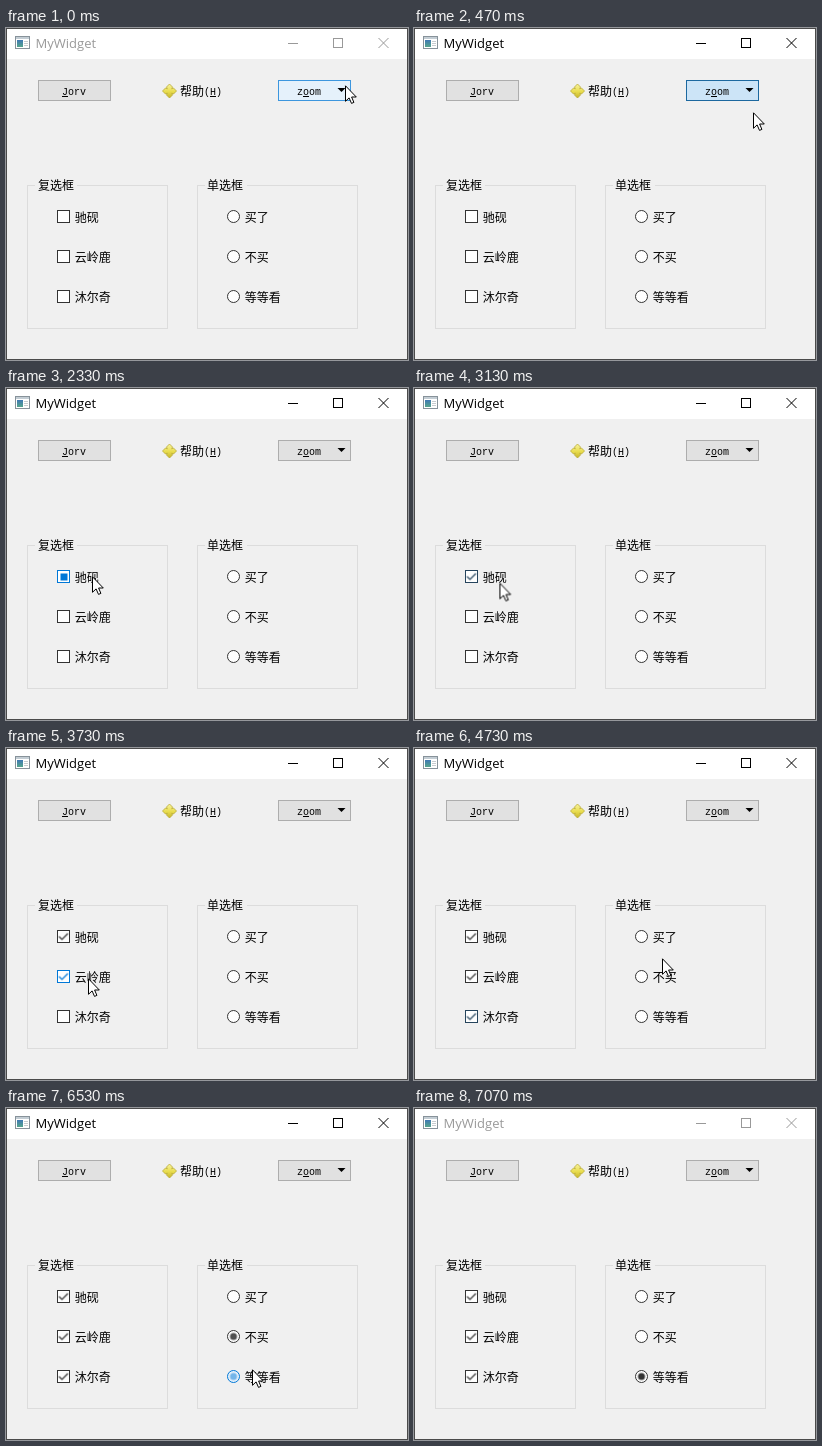
These frames come from a looping animation (402x332 px, 7190 ms). An HTML page:

```html
<!DOCTYPE html>
<html lang="zh-CN">
<head>
<meta charset="utf-8">
<title>MyWidget</title>
<style>
html, body { margin: 0; width: 100%; height: 100%; overflow: hidden; background: #f0f0f0; }
svg { display: block; width: 402px; height: 332px; }
text { font: 500 12px "Noto Sans CJK SC", "Noto Sans CJK", sans-serif; fill: #000; }
.mono { font: 10px "Liberation Mono", "DejaVu Sans Mono", monospace; }
#caption { color: #999; }
#caption text { font: 13px "Open Sans", "Noto Sans", sans-serif; fill: currentColor; }
.line { fill: none; stroke: currentColor; }
.crisp { shape-rendering: crispEdges; }
.button { fill: #e1e1e1; stroke: #adadad; }
.group { fill: none; stroke: #dcdcdc; }
.option { color: #333; }
.box { fill: #fff; stroke: currentColor; }
.tick { fill: none; stroke: currentColor; stroke-width: 1.2; opacity: 0; }
.dot { fill: currentColor; opacity: 0; }
</style>
</head>
<body>
<svg viewBox="0 0 402 332">
  <defs>
    <linearGradient id="gold" x2="0" y2="1">
      <stop stop-color="#f8f3a0"/><stop offset=".55" stop-color="#e8dc4c"/><stop offset="1" stop-color="#c4b32c"/>
    </linearGradient>
    <linearGradient id="pane" x2="0" y2="1">
      <stop stop-color="#3f78b4"/><stop offset="1" stop-color="#55a58b"/>
    </linearGradient>
  </defs>

  <rect width="402" height="332" fill="#f0f0f0"/>
  <rect width="402" height="31" fill="#fff"/>

  <g class="crisp">
    <rect x="9.5" y="8.5" width="14" height="12" fill="#fff" stroke="#87929a"/>
    <rect x="10" y="9" width="13" height="2" fill="#c3cdd4"/>
    <rect x="11" y="12" width="6" height="7" fill="url(#pane)"/>
    <path d="M18 13.5h4M18 15.5h4M18 17.5h4" stroke="#c8cdd0"/>
  </g>
  <g id="caption">
    <text x="29.5" y="20">MyWidget</text>
    <path class="line crisp" d="M282 15.5h10M327.5 10.5h9v9h-9z"/>
    <path class="line" d="M372.5 10l10 10M382.500 10l-10 10"/>
  </g>

  <g class="crisp">
    <rect class="button" x="32.5" y="52.5" width="72" height="20"/>
    <rect class="button" id="zoom" x="272.5" y="52.5" width="72" height="20"/>
    <path d="M56 68.5h6M204 68.5h6M297 68.5h6" stroke="#000"/>
  </g>
  <text class="mono" x="56" y="67">Jorv</text>
  <text class="mono" x="291" y="67">zoom</text>
  <path d="M331.5 60h8l-4 4z"/>

  <path transform="translate(163.500 63)" fill="url(#gold)" stroke="#b9ab35" stroke-width=".8" stroke-linejoin="round"
        d="M0-7L3-4 2.200-2.200 4-3 7 0 4 3 2.200 2.200 3 4 0 7-3 4-2.200 2.200-4 3-7 0-4-3-2.200-2.200-3-4Z"/>
  <text x="174" y="67.5">帮助</text>
  <text class="mono" x="198" y="67">(H)</text>

  <g class="crisp">
    <path class="group" d="M29 157.5h-7.5v143h140v-143H71"/>
    <path class="group" d="M199 157.5h-7.5v143h160v-143H241"/>
  </g>
  <text x="32" y="162">复选框</text>
  <text x="201" y="162">单选框</text>

  <g id="options"></g>

  <path id="cursor" d="M.5 .8V16.3L4.100 12.900 6.500 18.400 8.900 17.400 6.600 12H11.300Z" fill="#fff" stroke="#000"/>

  <rect class="crisp" x=".5" y=".5" width="401" height="331" fill="none" stroke="#4a4a4a"/>
</svg>

<script>
const LOOP = 7190, STEP = 1000 / 15, ROW = 40;
const DARK = '#333', BLUE = '#0078d7', PRESSED = '#cce4f7', MENU = '#1c689f';
const $ = id => document.getElementById(id);
const tracks = [];

// keys: [ms, value] pairs; the first and last values are held
function animate(el, prop, keys, easing = 'linear') {
  const all = [[0, keys[0][1]], ...keys, [LOOP, keys.at(-1)[1]]];
  const track = el.animate(
    all.map(([ms, value]) => ({ offset: ms / LOOP, easing, [prop]: value })),
    { duration: LOOP, iterations: Infinity });
  track.pause();
  tracks.push(track);
}

// Each option is entered, clicked and left by the pointer
const checks = [
  { label: '驰砚', enter: 1733, clicks: [2000, 2600], leave: 2934 },
  { label: '云岭鹿', enter: 3200, clicks: [3400], leave: 3867 },
  { label: '沐尔奇', enter: 4067, clicks: [4200], leave: 4533 }
];
const radios = [
  { label: '买了', enter: 4867, clicks: [5067], leave: 5300 },
  { label: '不买', enter: 5400, clicks: [5733], leave: 6000 },
  { label: '等等看', enter: 6133, clicks: [6400], leave: 6667 }
];

const checkMark = `<rect class="box crisp" x="-6" y="-6" width="12" height="12"/>
  <rect class="dot crisp" x="-3.5" y="-3.5" width="7" height="7"/>
  <path class="tick" d="M-4.500 0L-1.500 2.900 4.400-3"/>`;
const radioMark = '<circle class="box" r="6"/><circle class="dot" r="3.5"/>';

function addOption({ label, enter, clicks, leave }, row, x, mark) {
  const y = 188.5 + ROW * row;
  $('options').insertAdjacentHTML('beforeend',
    `<g class="option" transform="translate(${x} ${y})">${mark}</g>
     <text x="${x + 11.3}" y="${y + 5}">${label}</text>`);
  const el = $('options').querySelector('g:last-of-type');
  animate(el, 'color',
    [[enter, DARK], [enter + 134, BLUE], [leave, BLUE], [leave + 267, DARK]]);
  animate(el.querySelector('.box'), 'fill', clicks.flatMap(ms =>
    [[ms, '#fff'], [ms + 67, PRESSED], [ms + 200, '#fff']]));
  return el;
}

const fadeIn = ms => [[ms + 67, 0], [ms + 200, 1]];
const fadeOut = (ms, length) => [[ms + 67, 1], [ms + 67 + length, 0]];

// With two clicks, a check box passes through its partial state
checks.forEach((item, i) => {
  const el = addOption(item, i, 57.5, checkMark);
  const [first, second] = item.clicks;
  animate(el.querySelector('.tick'), 'opacity', fadeIn(second ?? first));
  if (second)
    animate(el.querySelector('.dot'), 'opacity', [...fadeIn(first), ...fadeOut(second, 133)]);
});

// A click on the next radio button clears this one
radios.forEach((item, i) => {
  const el = addOption(item, i, 227.5, radioMark);
  const next = radios[i + 1];
  animate(el.querySelector('.dot'), 'opacity',
    [...fadeIn(item.clicks[0]), ...(next ? fadeOut(next.clicks[0], 467) : [])]);
});

// Window and menu button
animate($('caption'), 'color',
  [[66, '#999'], [66, '#000'], [7066, '#000'], [7066, '#999']]);
animate($('zoom'), 'fill',
  [[67, '#e5f1fb'], [267, PRESSED], [1200, PRESSED], [1533, '#e1e1e1']]);
animate($('zoom'), 'stroke',
  [[67, '#3c96de'], [267, MENU], [1200, MENU], [1533, '#adadad']]);

// Pointer moves: departure, arrival, x, y
const moves = [
  [0, 67, 339, 57], [67, 600, 339, 88], [1200, 1867, 86, 188], [2934, 3667, 82, 230],
  [3867, 4200, 82, 268], [4400, 4733, 248, 210], [4733, 5000, 246, 190],
  [5333, 5667, 246, 231], [6000, 6333, 246, 261], [6600, 6933, 100, 345]
];
let place = 'translate(339px, 57px)';
animate($('cursor'), 'transform', moves.flatMap(([from, to, x, y]) => {
  const last = place;
  place = `translate(${x}px, ${y}px)`;
  return [[from, last], [to, place]];
}), 'ease-in-out');

const start = performance.now();
function draw() {
  const t = (performance.now() - start) % LOOP;
  const time = Math.floor(t / STEP + .05) * STEP;
  for (const track of tracks) track.currentTime = time;
  requestAnimationFrame(draw);
}
draw();
</script>
</body>
</html>
```
